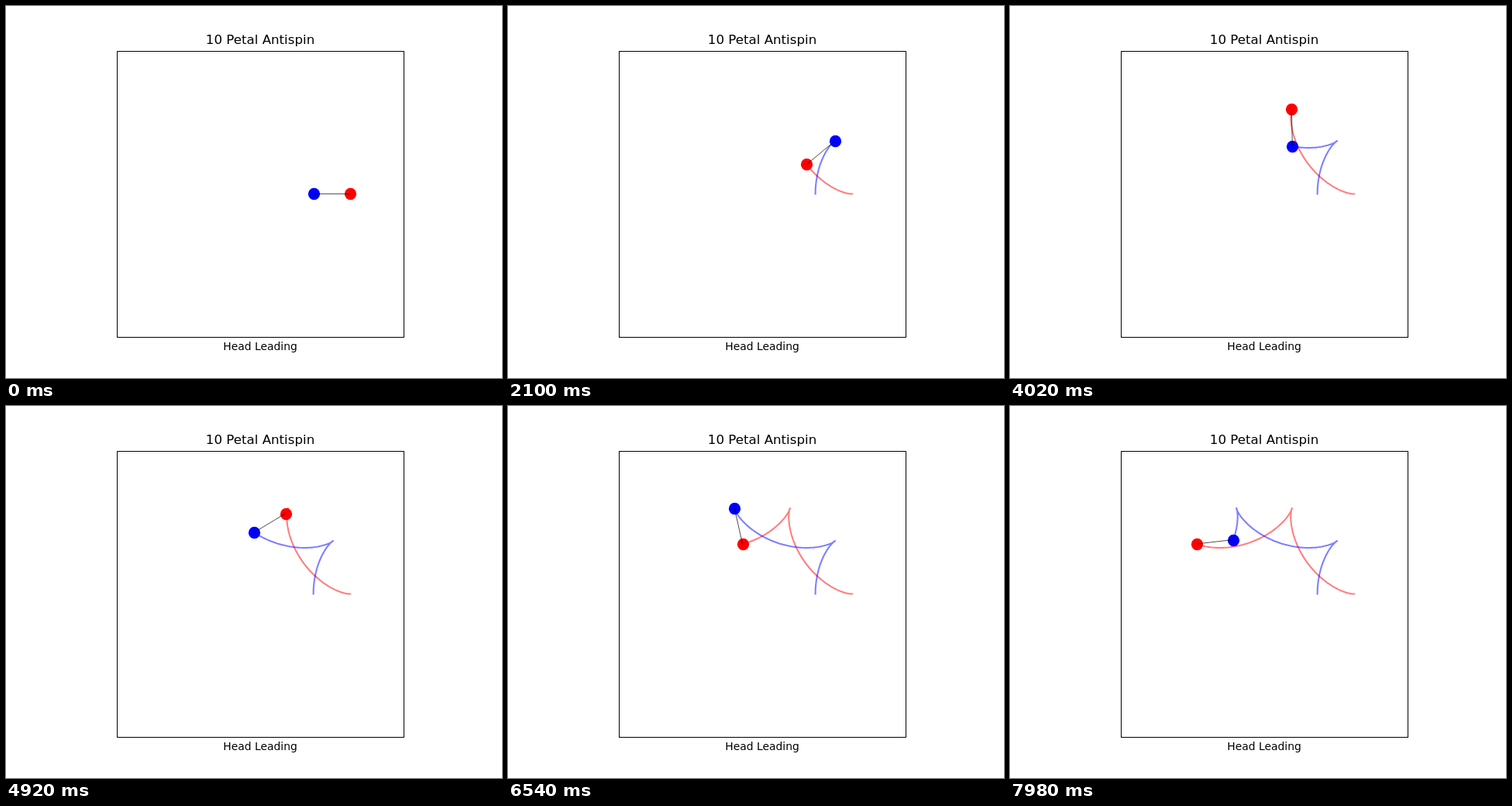
Recreate the animation shown at these times as an HTML page. Size 640 by 480 pixels, loop 8 s.

```html
<!DOCTYPE html>
<html lang="en">
<head>
<meta charset="utf-8">
<title>Antispin</title>
<style>
  html, body { margin: 0; width: 100%; height: 100%; overflow: hidden; background: #fff; }
  svg { display: block; width: 640px; height: 480px; }
  text { font-family: "DejaVu Sans", sans-serif; text-anchor: middle; }
  path { fill: none; stroke-linejoin: round; }
  .trail { stroke-width: 2.08; stroke-opacity: .5; stroke-linecap: square; }
</style>
</head>
<body>
<svg viewBox="0 0 640 480">
  <rect x="143.5" y="58.5" width="370" height="369" fill="none" stroke="#000"/>
  <text x="328" y="49" font-size="16.667">10 Petal Antispin</text>
  <text x="328" y="444" font-size="13.889">Head Leading</text>
  <path id="redTrail" class="trail" stroke="#f00"/>
  <path id="blueTrail" class="trail" stroke="#00f"/>
  <circle id="redHead" r="7.64" fill="#f00"/>
  <circle id="blueHead" r="7.64" fill="#00f"/>
  <path id="tether" stroke="#000" stroke-width=".7"/>
</svg>
<script>
  const LOOP = 8000, STEP = 60;
  const CENTER = { x: 328, y: 242.4 };
  const ARM = 92.4, POI = 23.75, SPIN = -4;
  const TURN = 2 * Math.PI / 359;
  const el = id => document.getElementById(id);

  // side is 1 for the red end, -1 for the blue end
  function position(step, side) {
    const a = step * TURN;
    return [
      CENTER.x + ARM * Math.cos(a) + side * POI * Math.cos(SPIN * a),
      CENTER.y - ARM * Math.sin(a) - side * POI * Math.sin(SPIN * a)
    ];
  }

  const toPath = points => "M" + points.map(p => p.map(v => v.toFixed(2)).join(" ")).join("L");
  const snap = v => Math.round(v) + 0.5;

  function drawEnd(name, side, step) {
    const points = Array.from({ length: step + 1 }, (_, i) => position(i, side));
    const [x, y] = points[step];
    el(name + "Trail").setAttribute("d", step ? toPath(points) : "");
    el(name + "Head").setAttribute("cx", snap(x));
    el(name + "Head").setAttribute("cy", snap(y));
    return [x, y];
  }

  let shown = -1;
  const start = performance.now();

  function render() {
    const step = Math.floor(((performance.now() - start) % LOOP) / STEP);
    if (step !== shown) {
      shown = step;
      el("tether").setAttribute("d", toPath([drawEnd("red", 1, step), drawEnd("blue", -1, step)]));
    }
    requestAnimationFrame(render);
  }
  render();
</script>
</body>
</html>
```
